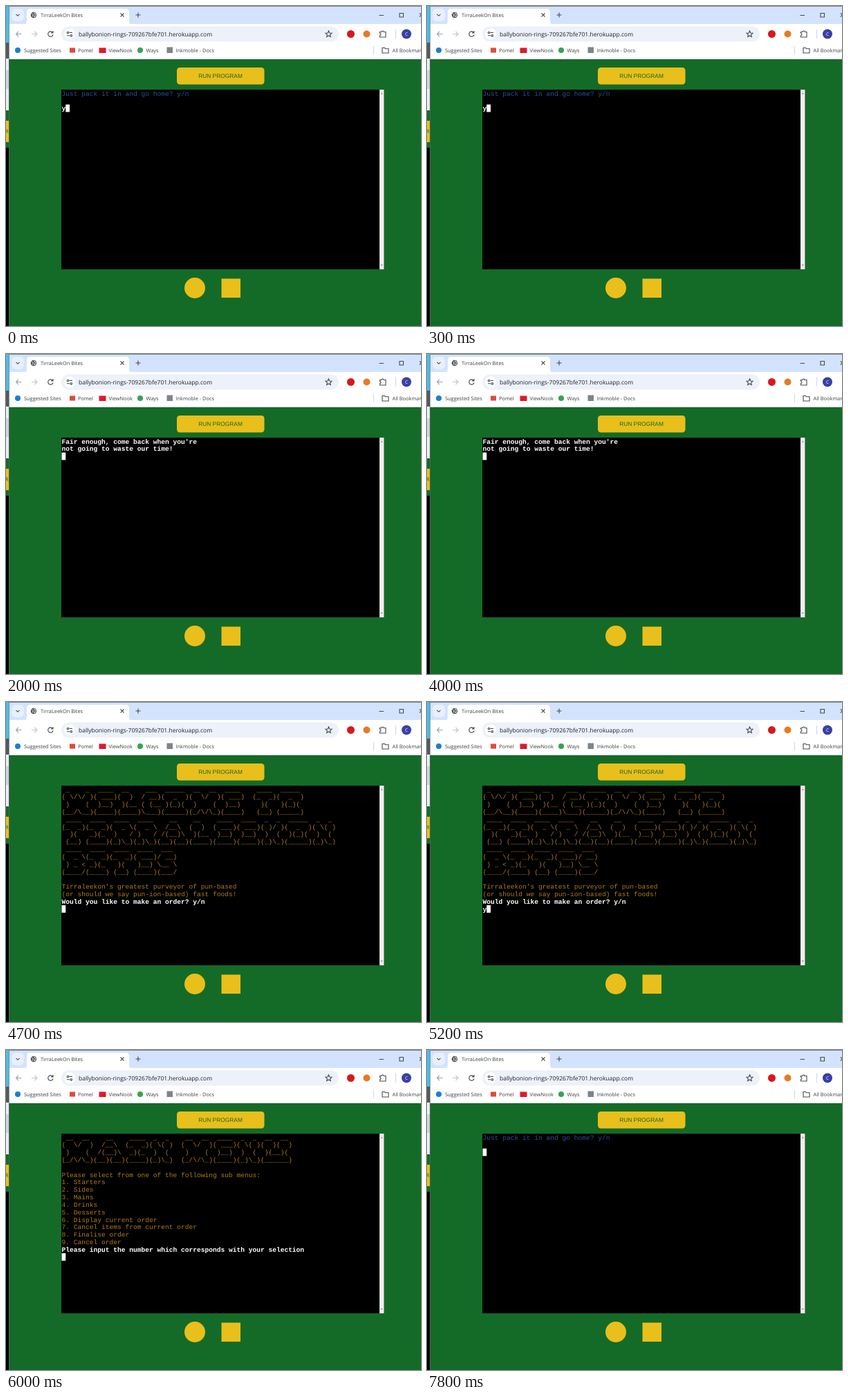
Recreate the animation shown at these times as an HTML page. Size 600 px wide and 463 px high, loop 8 s.

```html
<!DOCTYPE html>
<html lang="en">
<head>
<meta charset="utf-8">
<title>Terminal in a browser</title>
<style>
  html, body { margin: 0; height: 100%; overflow: hidden; }
  svg { display: block; width: 100vw; height: 100vh; }
  text { font-family: "Open Sans", sans-serif; font-size: 7.4px; fill: #3c4043; text-rendering: geometricPrecision; }
  #screen text { font-family: "Liberation Mono", monospace; font-size: 9.58px; white-space: pre; }
  .line { fill: none; stroke: #444a50; stroke-width: 1.1; }
</style>
</head>
<body>
<svg viewBox="0 0 600 463" preserveAspectRatio="none">
  <!-- window behind -->
  <rect width="5" height="463" fill="#000"/>
  <rect width="4" height="53" fill="#48bde8"/>
  <rect y="53" width="4" height="23" fill="#53585c"/>
  <rect y="76" width="4" height="75" fill="#e9edf2"/>
  <rect y="93" width="4" height="27" fill="#cfd5db"/>
  <rect y="151" width="4" height="54" fill="#146b27"/>
  <rect y="166" width="4" height="31" fill="#e9bf1c"/>
  <text x="-1" y="184" style="fill:#146b27">R</text>

  <!-- tab strip -->
  <rect x="4" width="596" height="30" fill="#d3e3fd"/>
  <rect x="4" width="596" height="1" fill="#78838f"/>
  <rect x="8" y="4" width="18" height="18" rx="6" fill="#e8f0fe"/>
  <path class="line" d="M14.5 11.8l2.5 2.5 2.5-2.5"/>
  <path d="M25 27q5 0 5-5V9q0-5 5-5H173q5 0 5 5v13q0 5 5 5z" fill="#fff"/>
  <circle cx="40" cy="13" r="4.3" fill="#50565c"/>
  <path d="M37 10.5l2.2 2.2-.6 2.6M40.5 9.5l.8 2 2.4.6M41 16l.4-2 2 .2" fill="none" stroke="#fff"/>
  <text x="50" y="15.8">TirraLeekOn Bites</text>
  <path class="line" d="M165.5 10.5l5 5m0-5l-5 5M187.5 13h7m-3.5-3.5v7"/>
  <path class="line" d="M539.5 13.5h6.5M569 10.5h5.5v5.500h-5.500zM598 10.5l5 5m0-5l-5 5"/>

  <!-- toolbar -->
  <rect x="4" y="26" width="596" height="51" fill="#fff"/>
  <path class="line" style="stroke:#9aa0a6" d="M22.5 40.5h-8m3.5-3.5l-3.5 3.5 3.5 3.5"/>
  <path class="line" style="stroke:#c0c4c8" d="M37 40.5h8m-3.5-3.5l3.5 3.5-3.5 3.5"/>
  <path class="line" d="M67.5 38.5a3.7 3.7 0 1 0 .5 3M68 36v3h-3"/>
  <rect x="80" y="29.5" width="401" height="22" rx="11" fill="#ecf1fa"/>
  <circle cx="92" cy="40.5" r="8" fill="#fff"/>
  <path class="line" d="M91.5 38.5h4.5M88 42.8h4"/>
  <circle class="line" cx="89.5" cy="38.5" r="1.3"/>
  <circle class="line" cx="94.3" cy="42.8" r="1.3"/>
  <text x="105" y="43.5" style="font-size:8.5px;fill:#202124">ballybonion-rings-709267bfe701.herokuapp.com</text>
  <path class="line" d="M466.5 36l1.3 3 3.2.3-2.4 2.2.7 3.2-2.8-1.7-2.8 1.7.7-3.2-2.4-2.2 3.2-.3z"/>
  <circle cx="498.5" cy="40.5" r="5.5" fill="#d8171f"/>
  <circle cx="521.5" cy="40.5" r="5" fill="#e77a22"/>
  <path class="line" d="M540.5 37.5h2.5a1.5 1.5 0 0 1 3 0h3v7.5h-8.5v-2.5a1.5 1.5 0 0 0 0-3z"/>
  <path d="M563.5 34v13M531.5 58v12" stroke="#c6d6ef"/>
  <circle cx="579" cy="40.5" r="7" fill="#3a40a4"/>
  <text x="579" y="43" text-anchor="middle" style="font-size:6.5px;fill:#fff">C</text>

  <!-- bookmarks -->
  <circle cx="17" cy="64" r="4" fill="#1a7fd0"/>
  <text x="26" y="66.5">Suggested Sites</text>
  <rect x="92" y="60.5" width="8" height="7" fill="#dd4b3e"/>
  <text x="104" y="66.5">Pomel</text>
  <rect x="134.5" y="60.5" width="10" height="7.5" fill="#e3172a"/>
  <text x="148.5" y="66.5">ViewNook</text>
  <circle cx="194" cy="64" r="4" fill="#36a352"/>
  <text x="202.5" y="66.5">Ways</text>
  <rect x="232.5" y="59.5" width="8.5" height="8.5" fill="#7d858c"/>
  <text x="245.5" y="66.5">Inkmoble - Docs</text>
  <path class="line" d="M544 60.5h3.5l1 1.2h4.5v6.3h-9z"/>
  <text x="558.5" y="66.5">All Bookmarks</text>

  <!-- page -->
  <rect x="5" y="77" width="595" height="386" fill="#146b27"/>
  <path d="M4.5 0V463" stroke="#6b7a80" stroke-width=".8"/>
  <rect x="247" y="89" width="126.5" height="24.5" rx="4.5" fill="#e9bf1c"/>
  <text x="310" y="104.3" text-anchor="middle" style="font:8.4px 'Liberation Sans',sans-serif;fill:#146b27">RUN PROGRAM</text>
  <rect x="80" y="121" width="466.5" height="260" fill="#000"/>
  <rect x="540" y="121" width="6.5" height="260" fill="#f0f0f0"/>
  <path d="M541.5 127.5l1.7-2 1.7 2zM541.5 374l1.7 2 1.7-2z" fill="#8a8a8a"/>
  <g id="screen"></g>
  <circle cx="273" cy="408" r="15" fill="#e9bf1c"/>
  <rect x="311.5" y="394.5" width="27.5" height="27.5" fill="#e9bf1c"/>
</svg>
<script>
const LOOP = 8000, LEFT = 80.5, TOP = 120.9, COL = 5.75, ROW = 10.82;
const AMBER = '#ac7c14', BLUE = '#2c5098', WHITE = '#fff';

// Each line: letter, then its four rows.
const glyphs = {};
String.raw`W _    _ |( \/\/ )| )    ( |(__/\__)
E ____ |( ___)| )__) |(____)
L __   |(  )  | )(__ |(____)
C ___ |/ __)|( (__|\___)
O _____ |(  _  )| )(_)( |(_____)
M __  __ |(  \/  )| )    ( |(_/\/\_)
T ____ |(_  _)|  )(  | (__) 
I ____ |(_  _)| _)(_ |(____)
R ____ |(  _ \| )   /|(_)\_)
A   __   |  /__\  | /(__)\ |(__)(__)
K _  _ |( )/ )| )  ( |(_)\_)
N _  _ |( \( )| )  ( |(_)\_)
B ____ |(  _ \| ) _ <|(____/
S ___ |/ __)|\__ \|(___/
U __  __ |(  )(  )| )(__)( |(______)
   |  |  |  `.split('\n').forEach(g => glyphs[g[0]] = g.slice(1).split('|'));

const banner = word => [0, 1, 2, 3].map(r => [...word].map(c => glyphs[c][r]).join(''));
const rows = (color, ...lines) => lines.map(text => ({ color, text }));

const quit = typed => [...rows(BLUE, 'Just pack it in and go home? y/n', ''), ...rows(WHITE, typed)];
const farewell = rows(WHITE, "Fair enough, come back when you're", 'not going to waste our time!', '');
const welcome = typed => [
  ...rows(AMBER, ...['WELCOME TO', 'TIRRALEEKON', 'BITES'].flatMap(banner), '',
    "Tirraleekon's greatest purveyor of pun-based",
    '(or should we say pun-ion-based) fast foods!'),
  ...rows(WHITE, 'Would you like to make an order? y/n', typed)];
const items = ['Starters', 'Sides', 'Mains', 'Drinks', 'Desserts', 'Display current order',
  'Cancel items from current order', 'Finalise order', 'Cancel order'];
const menu = [
  ...rows(AMBER, ...banner('MAIN MENU'), '', 'Please select from one of the following sub menus:',
    ...items.map((item, i) => `${i + 1}. ${item}`)),
  ...rows(WHITE, 'Please input the number which corresponds with your selection', '')];

const timeline = [
  [0, quit('y')], [1100, farewell], [4700, welcome('')],
  [5200, welcome('y')], [5500, menu], [7800, quit('')]];

const screen = document.getElementById('screen');
function add(tag, attributes, text = '') {
  const node = document.createElementNS('http://www.w3.org/2000/svg', tag);
  for (const key in attributes) node.setAttribute(key, attributes[key]);
  node.textContent = text;
  screen.append(node);
}

function show(lines) {
  screen.replaceChildren();
  lines.forEach(({ color, text }, r) => add('text', {
    x: LEFT, y: TOP + ROW * r + 8.6,
    style: `fill:${color};font-weight:${color === WHITE ? 'bold' : 'normal'}` }, text));
  const last = lines.length - 1;
  add('rect', { x: LEFT + COL * lines[last].text.length, y: TOP + ROW * last,
    width: COL, height: ROW, fill: WHITE });
}

let current;
function tick() {
  const time = performance.now() % LOOP;
  const lines = timeline.findLast(([start]) => start <= time)[1];
  if (lines !== current) show(current = lines);
  requestAnimationFrame(tick);
}
tick();
</script>
</body>
</html>
```
